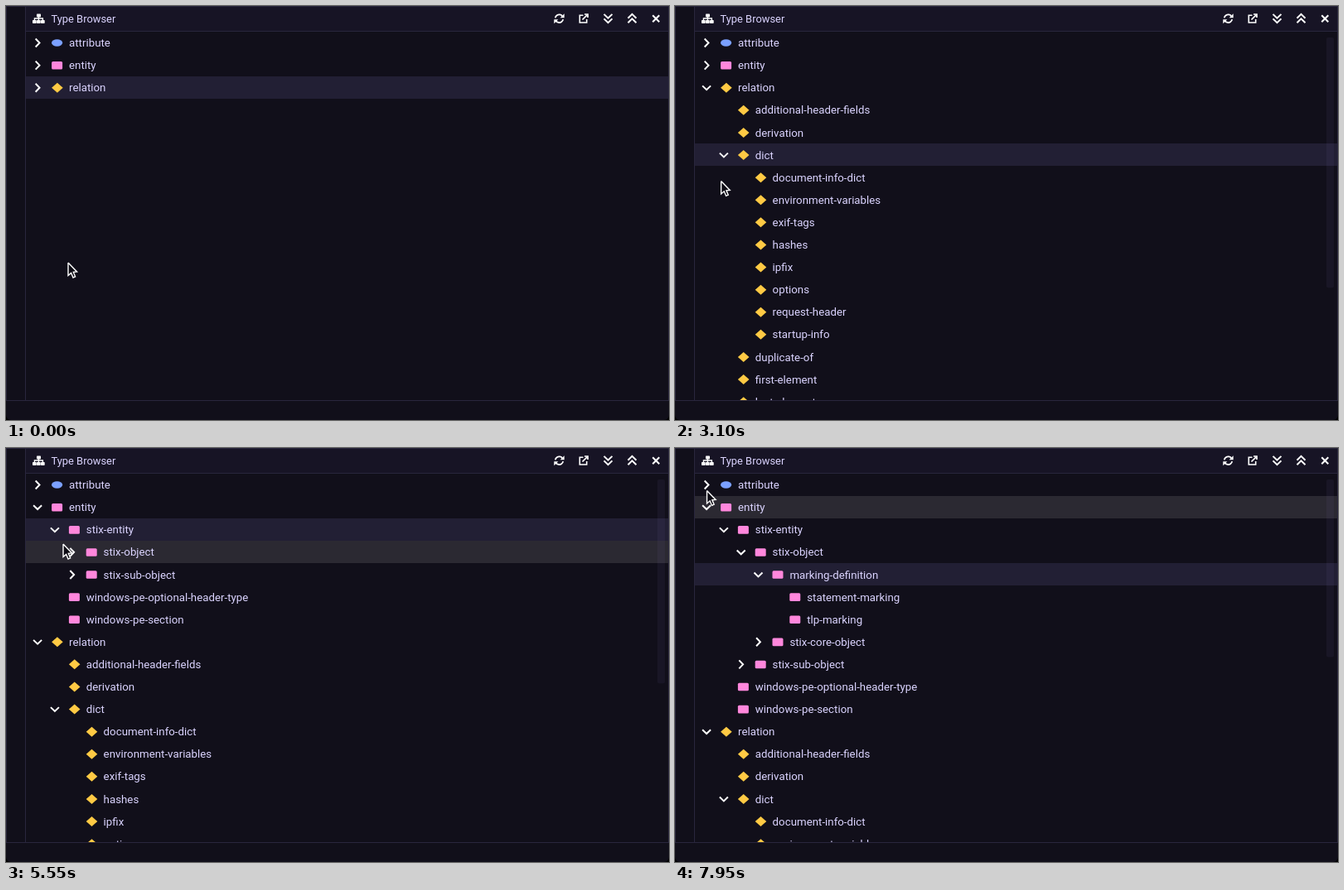
An HTML page with a canvas for the animation above (8 s loop, 800x500 px).

```html
<!DOCTYPE html>
<html lang="en">
<head>
<meta charset="utf-8">
<title>Type Browser</title>
<style>
  html, body { margin: 0; height: 100%; overflow: hidden; background: #000; }
  canvas { display: block; }
</style>
</head>
<body>
<canvas id="stage" width="800" height="500"></canvas>
<script>
const ctx = document.getElementById('stage').getContext('2d');
const LOOP = 8000, TOP = 31, ROW = 27.1, INDENT = 20.8, VIEW = 445, HOVER_LAG = 50;
const BG = '#110f1a', HEADER = '#171425', LINE = '#29263d', TEXT = '#dbd4ff',
      SELECTED = '#221f34', HOVER = '#2b2932', THUMB = 'rgba(130, 120, 200, .07)';

// Two spaces per level; "+" marks a node that has children.
const TREE = `
+attribute
+entity
  +stix-entity
    +stix-object
      +marking-definition
        statement-marking
        tlp-marking
      +stix-core-object
    +stix-sub-object
  windows-pe-optional-header-type
  windows-pe-section
+relation
  additional-header-fields
  derivation
  +dict
    document-info-dict
    environment-variables
    exif-tags
    hashes
    ipfix
    options
    request-header
    startup-info
  duplicate-of
  first-element
  last-element
  +list
  list-element
  node
  +ref
  +stix-core-relationship`;

let kind;
const nodes = TREE.trim().split('\n').map(line => {
  const [, pad, plus, name] = line.match(/^( *)(\+?)(.*)$/);
  if (!pad) kind = name;
  return { name, kind, depth: pad.length / 2, parent: !!plus };
});

const CLICKS = { relation: 1350, dict: 2700, entity: 4200, 'stix-entity': 5100,
                 'stix-object': 6050, 'marking-definition': 7050 };

const isOpen = (node, t) => t >= CLICKS[node.name];

function visibleRows(t) {
  let limit = 0;
  return nodes.filter(node => {
    if (node.depth > limit) return false;
    limit = node.depth + (isOpen(node, t) ? 1 : 0);
    return true;
  });
}

function selectedName(t) {
  const clicked = Object.keys(CLICKS).filter(name => t >= CLICKS[name]);
  return clicked.pop() || 'relation';
}

// Where the pointer rests on a node's chevron
function restingPoint(name, t) {
  const rows = visibleRows(t), i = rows.findIndex(node => node.name === name);
  return [34 + rows[i].depth * INDENT, TOP + (i + .5) * ROW - 1];
}

// Pointer moves go to a named node or to a free point.
const START = [75, 310];
const move = (start, end, to) =>
  ({ start, end, to: typeof to === 'string' ? restingPoint(to, start) : to });
const MOVES = [
  move(50, 500, [100, 21]),
  move(500, 850, 'relation'),
  move(1600, 1750, [55, 89]),
  move(1900, 2400, [56, 216]),
  move(2400, 2450, 'dict'),
  move(3050, 3250, [60, 379]),
  move(3250, 3450, [28, 89]),
  move(3500, 3850, 'entity'),
  move(4450, 4550, [43, 86]),
  move(4550, 4950, 'stix-entity'),
  move(5400, 5540, [69, 116]),
  move(5540, 5900, 'stix-object'),
  move(6350, 6850, 'marking-definition'),
  move(7450, 8050, 'attribute')
];

function pointer(t) {
  return MOVES.reduce((from, { start, end, to }) => {
    const u = Math.min(1, Math.max(0, (t - start) / (end - start)));
    const ease = u * u * (3 - 2 * u);
    return from.map((value, axis) => value + (to[axis] - value) * ease);
  }, START);
}

function box(color, x, y, w, h, r = 0) {
  ctx.fillStyle = color;
  ctx.beginPath();
  ctx.roundRect(x, y, w, h, r);
  ctx.fill();
}

function trace(x, y, points) {
  ctx.beginPath();
  for (let i = 0; i < points.length; i += 2) ctx.lineTo(x + points[i], y + points[i + 1]);
}

function stroke(x, y, points, width = 2) {
  trace(x, y, points);
  ctx.lineWidth = width;
  ctx.strokeStyle = '#fff';
  ctx.stroke();
}

function fill(x, y, points, color = '#fff') {
  trace(x, y, points);
  ctx.fillStyle = color;
  ctx.fill();
}

function rotated(x, y, angle, paint) {
  ctx.save();
  ctx.translate(x, y);
  ctx.rotate(angle);
  paint();
  ctx.restore();
}

const RIGHT = 0, DOWN = Math.PI / 2, UP = -DOWN;
const chevron = (x, y, angle) =>
  rotated(x, y, angle, () => stroke(0, 0, [-2.4, -5, 2.4, 0, -2.4, 5]));

function label(text, x, y, size) {
  ctx.font = size + 'px Roboto, sans-serif';
  ctx.fillStyle = TEXT;
  ctx.fillText(text, x, y);
}

function typeIcon(kind, x, y) {
  if (kind === 'entity') return box('#ff87dc', x - 6.5, y - 4.7, 13, 9.6, 1.5);
  if (kind === 'relation') return fill(x + .3, y, [-6.8, 0, 0, -6, 6.8, 0, 0, 6], '#ffca44');
  ctx.fillStyle = '#7ba0ff';
  ctx.beginPath();
  ctx.ellipse(x, y, 6.6, 4.2, 0, 0, 7);
  ctx.fill();
}

function header() {
  box(HEADER, 24, 1, 775, 29);
  box(LINE, 24, 30, 776, 1);
  label('Type Browser', 54.5, 20, 12.9);

  // Hierarchy
  box('#fff', 37, 9.5, 5, 4, .7);
  for (const x of [32, 37, 42]) box('#fff', x, 17, 4.7, 4, .7);
  stroke(39.4, 13, [0, 0, 0, 4], 1.3);
  stroke(34.4, 17, [0, 0, 0, -2, 10, -2, 10, 0], 1.3);

  // Refresh
  for (const angle of [0, Math.PI]) rotated(667.5, 15.2, angle, () => {
    ctx.lineWidth = 1.8;
    ctx.beginPath();
    ctx.arc(0, 0, 4.8, Math.PI * 1.06, Math.PI * 1.82);
    ctx.stroke();
    fill(0, 0, [6.2, -6, 6.2, -1, 1.2, -1]);
  });

  // Open in window
  stroke(697, 15, [-.5, -3.7, -4.7, -3.7, -4.7, 5, 3.7, 5, 3.7, 1], 1.6);
  stroke(697, 15, [-1.5, 1.5, 4.7, -4.7], 1.7);
  stroke(697, 15, [1, -5, 5, -5, 5, -1], 1.7);

  // Expand, collapse, close
  for (const dy of [-2.7, 2.8]) {
    chevron(726.5, 15 + dy, DOWN);
    chevron(755.5, 15 + dy, UP);
  }
  for (const s of [-4, 4]) stroke(784.3, 15.3, [-4, s, 4, -s]);
}

function tree(t) {
  const rows = visibleRows(t), selected = selectedName(t);
  const hovered = t < CLICKS.relation ? -1
    : Math.floor((pointer(t - HOVER_LAG)[1] - TOP) / ROW);

  ctx.save();
  ctx.beginPath();
  ctx.rect(24, TOP, 775, VIEW);
  ctx.clip();
  rows.forEach((node, i) => {
    const top = TOP + i * ROW, y = top + ROW / 2, dx = node.depth * INDENT;
    const shade = node.name === selected ? SELECTED : i === hovered && HOVER;
    if (shade) box(shade, 24, Math.floor(top), 775, 27);
    if (node.parent) chevron(38.1 + dx, y, isOpen(node, t) ? DOWN : RIGHT);
    typeIcon(node.kind, 61.6 + dx, y);
    label(node.name, 76 + dx, y + 4.6, 13.3);
  });
  const height = rows.length * ROW;
  if (height > VIEW) box(THUMB, 786, 38, 9, VIEW * 405 / height, 2);
  ctx.restore();
}

function cursor([x, y]) {
  const arrow = [0, 0, 0, 15.5, 3.6, 12.4, 6, 18, 8.6, 16.8, 6.3, 11.4, 10.6, 11, 0, 0];
  fill(x, y, arrow, '#0d0b14');
  stroke(x, y, arrow, 1.4);
}

function draw(t) {
  box('#000', 0, 0, 800, 500);
  box(BG, 0, 0, 800, 500, [0, 0, 6, 6]);
  header();
  tree(t);
  for (const x of [0, 23, 799]) box(LINE, x, 0, 1, 476);
  for (const y of [0, 476]) box(LINE, 0, y, 800, 1);
  cursor(pointer(t));
}

function frame() {
  draw(performance.now() % LOOP);
  requestAnimationFrame(frame);
}
frame();
</script>
</body>
</html>
```
